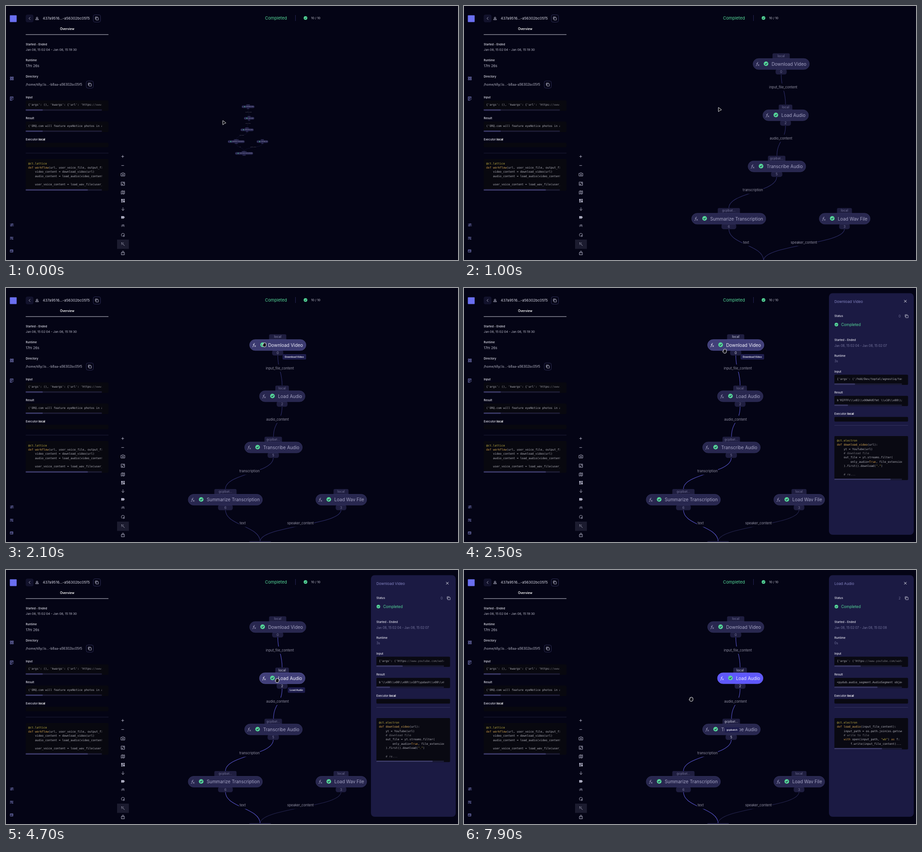
An HTML page that plays this animation: 997 px wide and 561 px high, repeating every 8 s.

```html
<!DOCTYPE html>
<html lang="en">
<head>
<meta charset="utf-8">
<title>Workflow graph</title>
<style>
html, body { margin: 0; width: 100%; height: 100%; overflow: hidden; background: #040415; }
svg { display: block; width: 100%; height: 100%; }
text { font-family: Inter, "Open Sans", sans-serif; white-space: pre; }
.mono { font-family: "DejaVu Sans Mono", monospace; font-size: 6.22px; }
.icon { fill: none; stroke: #a9a9bd; stroke-width: 1; stroke-linecap: round; stroke-linejoin: round; }
.nav { stroke: #6669a8; }
</style>
</head>
<body>
<svg id="stage" viewBox="0 0 997 561" xmlns="http://www.w3.org/2000/svg"></svg>
<script>
const LOOP = 8000, STEP = 100;
const PAGE = '#040415', GREEN = '#55d899', LIGHT = '#e4e4ee', SOFT = '#b9b9c8';
const SYNTAX = { t: '#b4b4bd', y: '#c3b044', o: '#d29a45', g: '#e0b05a', c: '#77777f' };

const esc = s => s.replace(/&/g, '&amp;').replace(/</g, '&lt;');
const text = (x, y, size, str, fill = LIGHT, extra = '') =>
  `<text x="${x}" y="${y + size * .36}" font-size="${size}" fill="${fill}" ${extra}>${esc(str)}</text>`;
const centered = (x, y, size, str, fill, extra = '') =>
  text(x, y, size, str, fill, `text-anchor="middle" ${extra}`);
const rect = (x, y, w, h, fill, r = 0, extra = '') =>
  `<rect x="${x}" y="${y}" width="${w}" height="${h}" rx="${r}" fill="${fill}" ${extra}/>`;
const icon = (x, y, d, extra = '') => `<path class="icon" transform="translate(${x} ${y})" d="${d}" ${extra}/>`;
const during = (from, to, body) => `<g data-from="${from}" data-to="${to}">${body}</g>`;
const check = (x, y, r, mark = PAGE) =>
  `<circle cx="${x}" cy="${y}" r="${r}" fill="${GREEN}"/>` +
  `<path d="M${x - r * .45} ${y}l${r * .33} ${r * .35}l${r * .6} ${-r * .65}" fill="none" stroke="${mark}" stroke-width="${r * .24}"/>`;

// Each piece of a code line starts with its colour key.
const codeLine = (x, y, line) => `<text class="mono" x="${x}" y="${y + 2.1}">` + line.split('|')
  .map(p => `<tspan fill="${SYNTAX[p[0]] || SYNTAX.t}">${esc(p.slice(1))}</tspan>`).join('') + '</text>';

function codeBox(side, y, h, thumb, lines, firstLine) {
  const [x, w, clip, fill, track] = side === 'left'
    ? [43.5, 182.5, 'clipLeft', '#08080f', '#1c1b34'] : [817, 162.5, 'clipRight', '#090912', '#1b1b36'];
  return rect(x, y, w, h, fill, 2) +
    `<g clip-path="url(#${clip})">${lines.map((l, i) => codeLine(x + 5.5, firstLine + i * 9.32, l)).join('')}</g>` +
    rect(x, y + h - 3.2, side === 'left' ? 168 : 149, 3, track, 1) + rect(x, y + h - 3.2, thumb, 3, '#383764', 1);
}

const COPY = 'M-1.5-1.5h5v5h-5zM-3.3 1.6V-3.3H1.6';
const label = (x, y, str) => text(x, y, 6.25, str, LIGHT, 'font-weight="500"');
const executor = (x, y) => label(x, y, 'Executor:') + text(x + 28.5, y, 6.2, 'local', '#fff', 'font-weight="700"');

function leftPanel() {
  return rect(8.5, 20.5, 15, 15, '#6a6ff0', 1) +
    rect(43.5, 19, 17, 17, '#12122c', 4) + icon(52, 27.5, 'M1.2-2.6L-1.4 0L1.2 2.6') +
    icon(68.5, 27.5, 'M-1.6-1.5a1.6 1.6 0 1 1 3.2 0a1.6 1.6 0 1 1-3.2 0M0 .2V3.4M-3.2 2.8Q-3 .2-1.2 0M3.2 2.8Q3 .2 1.2 0M-3.2 2.8h2M3.2 2.8h-2') +
    text(81, 27.5, 8.05, '437a9516...-a56302bc05f5', '#d5d5e2') +
    rect(192.5, 19.5, 16, 16, 'none', 3.5, 'stroke="#303058" stroke-width=".9"') + icon(200.3, 27.4, COPY) +
    centered(135, 50.5, 6.9, 'Overview', '#fff', 'font-weight="600"') + rect(43.5, 62.6, 182.5, 1, '#c8c8d4') +
    label(43.5, 85, 'Started - Ended') + text(43.5, 97, 6.8, 'Jan 08, 15:02:04 - Jan 08, 15:19:30', SOFT) +
    label(43.5, 119.5, 'Runtime') + text(43.5, 132.3, 7.8, '17m 26s', SOFT) +
    label(43.5, 156, 'Directory') + text(43.5, 173.7, 7.1, '/home/tilly/.lo...-b8aa-a56302bc05f5', SOFT) +
    rect(177, 165.7, 15.6, 15.6, 'none', 3.5, 'stroke="#303058" stroke-width=".9"') + icon(184.8, 173.4, COPY) +
    label(43.5, 201.5, 'Input') +
    codeBox('left', 208.5, 23, 37.5, ["t{'args': (), 'kwargs': {'url': 'https:|c//www.videos"], 218) +
    label(43.5, 248.2, 'Result') +
    codeBox('left', 255.3, 23, 37.5, ["t('ORQ.com will feature eyeNotice photos in a new"], 264.7) +
    executor(43.5, 295) + rect(43.5, 302, 182.5, 10, '#08080f', 2) +
    rect(43.5, 324.5, 182.5, .9, '#22223c') +
    codeBox('left', 338, 70, 137, ['y@ct.lattice', 'odef |gworkflow|t(url, user_voice_file, output_file):',
      't    video_content = download_video(url)', 't    audio_content = load_audio(video_content)', 't',
      't    user_voice_content = load_wav_file(user_voice_file)'], 347.5);
}

function navIcons() {
  const n = 'style="stroke:#7476b8"';
  return icon(13, 160, 'M-3.3-3.3h2.4v2.4h-2.4zM.9-3.3h2.4v2.4H.9zM-3.3.9h2.4v2.4h-2.4zM.9.9h2.4v2.4H.9zM-.9-2.1h1.8M-2.1-.9v1.8M2.1-.9v1.8', n) +
    icon(12.8, 204.5, 'M3-1V-4h-6.5v8H0M-2-2H1.5M-2 0H1M-2 2h1.5M1 3.5L3.7.6', n) +
    icon(13, 483.5, 'M-3.8-1.6h4M2.4-1.6h1.4M.6-2.8a1.2 1.2 0 1 1 0 2.4a1.2 1.2 0 1 1 0-2.4M-3.8 1.8h1M0 1.8h3.8M-1.5.6a1.2 1.2 0 1 1 0 2.4a1.2 1.2 0 1 1 0-2.4', n) +
    icon(12.5, 513, 'M-3.3-2.3h6.6M-3.3 0h3M1.2 0h2M-3.3 2.3h1.2M0 2.3h3.3M-1.3-2.8v1M.6-.8v1.6', n) +
    icon(12.5, 541, 'M-2.8-2.6h5.6v5.2h-5.6zM-2.8-1h5.6M0 1h1.3', n);
}

function toolbar() {
  const solid = 'style="fill:#a9a9bd;stroke:none"';
  return rect(245, 516, 26, 20.5, '#1b1b2f') +
    icon(257.4, 332.4, 'M-2.5 0h5M0-2.5v5') + icon(257.4, 352.3, 'M-2.5 0h5') +
    icon(258, 372, 'M-4-2.5h2l.9-1.2h2.2l.9 1.2h2v6h-8zM-1.5.4a1.5 1.5 0 1 1 3 0a1.5 1.5 0 1 1-3 0') +
    icon(258, 392.5, 'M-3.6-3.6h7.2v7.2h-7.2zM0-2h2V0M0 2h-2V0') +
    icon(258, 411.8, 'M-3.6-2.8l2.4-.8l2.4.8l2.4-.8v6.4l-2.4.8l-2.4-.8l-2.4.8zM-1.2-3.6v6.4M1.2-2.8v6.4') +
    icon(258, 430, 'M-4-3.8h3.6V.5H-4zM.4-3.8H4v2.3H.4zM.4-.5H4v4.3H.4zM-4 1.5h3.6v2.3H-4z', solid) +
    icon(258, 448.5, 'M0-3.2V3.2M-3 .3L0 3.2L3 .3') +
    icon(258, 466.8, 'M-4-2.8H1.8L4 0L1.8 2.8H-4z', solid) +
    centered(258, 485, 5.6, '(#)', '#a9a9bd', 'font-weight="600"') +
    icon(258, 505.5, 'M-1 3.4a3.5 3.5 0 1 1 4.4-3M.8 1l3 1.1l-1.5.6l-.5 1.4z') +
    icon(258, 526, 'M-.6-.6L3.2 3.2M-2.5-3.2v1.6M-3.3-2.4h1.6M.8-3v1M-3 .7h1') +
    icon(258, 545.5, 'M-3.2-1h6.4v5h-6.4zM-1.8-1v-1.4a1.8 1.8 0 0 1 3.6 0V-1M0 1.3v.4');
}

const header = () => text(571.3, 26.6, 9.4, 'Completed', GREEN) + rect(638, 20, .9, 13, '#2b2b5c') +
  check(660.6, 26.6, 4) + text(673, 26.6, 6.8, '10 / 10', '#c2c2d0');

// fill, border, title, tag text
const LOOKS = {
  idle: ['#28274f', '#32315c', '#a5a4c4', '#77769c'],
  hover: ['#3b3a70', '#4b4a84', '#ececf8', '#8f8eb0'],
  active: ['#413f79', '#57569a', '#f4f4fc', '#d6d6ea'],
  chosen: ['#5f58fb', '#6a64ff', '#ececff', '#d6d6ea'],
  tagged: ['#28274f', '#32315c', '#a5a4c4', '#d6d6ea']
};

function nodeLook([title, left, width, y, mid, tag, tagWidth, index, badgeWidth], look) {
  const [fill, border, ink, small] = LOOKS[look];
  return rect(mid - tagWidth / 2, y - 23.5, tagWidth, 14, '#1f1e40', 3) + centered(mid, y - 18, 7.15, tag, small) +
    rect(mid - badgeWidth / 2, y + 11.2, badgeWidth, 12, '#1f1e40', 4.5) + centered(mid, y + 17.4, 7.4, index, small) +
    rect(left + .4, y - 11.9, width - .8, 24, fill, 12, `stroke="${border}" stroke-width=".9"`) +
    `<path d="M${left + 6.5} ${y + 4.2}q1.7.3 2.2-2l1-4.3q.5-2 2.1-1.5M${left + 7.8} ${y - .9}h3.4M${left + 11} ${y + .9}l3 3.3m0-3.3l-3 3.3" fill="none" stroke="${ink}" stroke-width=".9"/>` +
    check(left + 29, y - .5, 5.1, '#28274f') + text(left + 41.2, y + .3, 9.92, title, ink);
}
const node = (spec, looks = [[0, 'idle']]) => looks.map(([from, look], i) =>
  during(from, looks[i + 1] ? looks[i + 1][0] : LOOP, nodeLook(spec, look))).join('');

const edge = (x1, y1, x2, y2, lit) => {
  const m = (y1 + y2) / 2;
  const path = color => `<path d="M${x1} ${y1}C${x1} ${m} ${x2} ${m} ${x2} ${y2}" fill="none" stroke="${color}" stroke-width="1.1"/>`;
  return during(0, 2300, path('#2f2f6a')) + during(2300, LOOP, path(lit ? '#5653c6' : '#25254f'));
};
const edgeLabel = (x, y, w, str) => rect(x - w / 2, y - 8, w, 16, PAGE) + centered(x, y, 7.5, str, '#9291a4');
const tooltip = (x, y, w, str) => rect(x - w / 2, y - 6, w, 12, '#1e1d4d', 2) +
  centered(x, y, 5.3, str, '#f2f2fa', 'font-weight="600"');

function graph() {
  return edge(599.5, 149, 609, 215, true) + edge(609, 262, 590, 329, true) + edge(589.5, 375, 484, 444, true) +
    edge(739, 490, 560.5, 560, false) + edge(484, 490, 560.5, 560, true) +
    edgeLabel(604, 177, 66, 'input_file_content') + edgeLabel(599, 290, 53, 'audio_content') +
    edgeLabel(537, 404.5, 46, 'transcription') + edgeLabel(522, 519.7, 16, 'text') +
    edgeLabel(649.5, 519.7, 60, 'speaker_content') +
    node(['Download Video', 537, 125, 125.8, 599.3, 'local', 38, '0', 24.5],
      [[0, 'idle'], [2000, 'hover'], [2300, 'active'], [3100, 'idle']]) +
    node(['Load Audio', 558.7, 101.3, 239, 609, 'local', 30, '2', 24],
      [[0, 'idle'], [3500, 'active'], [6500, 'chosen']]) +
    node(['Transcribe Audio', 526, 128, 352, 589.5, 'gcpbat...', 38.5, '5', 25], [[0, 'idle'], [6600, 'tagged']]) +
    node(['Summarize Transcription', 401.5, 164.5, 467.5, 484, 'gcpbat...', 49, '6', 32.5]) +
    node(['Load Wav File', 683, 113, 467.5, 739, 'local', 33, '3', 23.5]) +
    node(['Clone Voice From Summary', 473, 175, 582.5, 560.5, 'gcpbat...', 49, '7', 32.5]) +
    during(2000, 3200, tooltip(636, 152, 52, 'Download Video')) +
    during(3600, 6500, tooltip(640.6, 265.2, 38, 'Load Audio')) +
    during(6700, LOOP, tooltip(591, 353, 33, 'gcpbatch'));
}

function detailPanel() {
  const dim = '#77779f';
  const summary = (title, index, dates, runtime) => text(817, 30, 8.15, title, '#8484c2') +
    text(958.8, 62.3, 7, index, dim) + text(817, 127, 6.95, dates, dim) + text(817, 161.5, 7, runtime, dim);
  const input = (thumb, line) => codeBox('right', 191.5, 22.5, thumb, [line], 201);
  const result = (thumb, line) => codeBox('right', 238.2, 22.5, thumb, [line], 247.6);
  return rect(805, 11.5, 187, 533.5, '#1b1a43', 8) +
    icon(973.5, 29.2, 'M-2.4-2.4l4.8 4.8M2.4-2.4l-4.8 4.8', 'style="stroke:#f0f0f6"') +
    label(817, 62, 'Status') + icon(976.3, 62.2, COPY) +
    check(821.4, 80.8, 4, '#1b1a43') + text(832, 81, 8.35, 'Completed', GREEN) +
    label(817, 115, 'Started - Ended') + label(817, 149.6, 'Runtime') +
    label(817, 184.5, 'Input') + label(817, 231.2, 'Result') +
    executor(817, 278) + rect(817, 284.7, 162.5, 10.3, '#090912', 2) + rect(817, 303, 162.5, .9, '#34335f') +
    during(0, 5000, summary('Download Video', '0', 'Jan 08, 15:02:04 - Jan 08, 15:02:07', '3s')) +
    during(5000, LOOP, summary('Load Audio', '2', 'Jan 08, 15:02:07 - Jan 08, 15:02:08', '0s')) +
    during(0, 3200, input(45.5, "t{'args': ('/hdd/Dev/toptal/agnostiq/test") +
      result(30, String.raw`tb'RIFFFc\\x01\\x00WAVEfmt \\x10\\x00\\x00`)) +
    during(3200, LOOP, input(58, "t{'args': ('https:|c//www.youtube.com/watch")) +
    during(3200, 6500, result(30, String.raw`tb'\\x00\\x00\\x00\\x18ftypdash\\x00\\x00`)) +
    during(6500, LOOP, result(95, 't<pydub.audio_segment.AudioSegment object')) +
    during(0, 6200, codeBox('right', 327, 97.3, 124, ['y@ct.electron', 'odef |gdownload_video|t(url):',
      't    yt = YouTube(url)', 'c    # download file', 't    out_file = yt.streams.filter(',
      't        only_audio=|oTrue|t, file_extension', 't    ).first().download(|y"."|t)', 't', 'c    # re...'], 337)) +
    during(6200, LOOP, codeBox('right', 327, 69.3, 105, ['y@ct.electron', 'odef |gload_audio|t(input_file_content):',
      't    input_path = os.path.join(os.getcwd()', 'c    # write to file',
      'o    with |topen(input_path, |y"wb"|t) |oas|t f:', 't        f.write(input_file_content)...'], 337));
}

const ARROW = '<path d="M-2.4-4.6Q-2.8-5.2-2-4.8L4.2-.2Q4.8.4 4 .8L1 1.5L-1.5 4.2Q-2.2 4.8-2.3 3.8Z" fill="#08080f" stroke="#fff" stroke-width=".9"/>';
const HAND = '<path d="M-3 1V-2.5q.9-1.2 1.8 0V-3.6q.9-1.3 1.8 0v-.2q.9-1 1.8.2v1q.9-.8 1.6.3V2Q3.8 4.8 1 5H-1Q-2.8 4.6-4.6 1.2q0-1.2 1.6-.2Z" fill="#14141c" stroke="#fff" stroke-width=".9"/>';

const stage = document.getElementById('stage');
stage.innerHTML = '<defs><clipPath id="clipLeft"><rect x="43.5" y="200" width="168" height="220"/></clipPath>' +
  '<clipPath id="clipRight"><rect x="817" y="180" width="149" height="260"/></clipPath></defs>' +
  `<g id="graph">${graph()}</g>` + rect(0, 0, 240, 561, PAGE) + leftPanel() + navIcons() + toolbar() + header() +
  `<g id="detail">${detailPanel()}</g>` +
  `<g id="cursor">${during(0, 1900, ARROW) + during(1900, LOOP, HAND)}</g>`;

const CURSOR = [[0, 480.5, 258], [700, 480.5, 258], [1000, 563.5, 229], [1100, 563.5, 229], [1500, 463.5, 227],
  [2000, 570, 125], [2200, 570, 125], [2500, 575, 139], [3000, 580, 170], [3700, 598, 243.5], [6000, 598, 243.5],
  [6300, 572.5, 305], [6600, 583, 332], [6900, 560, 315], [7200, 488, 262], [7400, 497, 242], [7700, 505, 305],
  [7900, 501, 285]];
const PAN = [[0, 100.2, 2.2], [1100, 100.2, 2.2], [1500, 0, 0]];
const ZOOM = [[0, 0], [200, 0], [800, 1]];
const SLIDE = [[0, 200], [2100, 200], [2200, 130], [2300, 45], [2400, 0]];
const SMALL = { scale: .2255, x: 398.8, y: 194.1 };

function track(keys, t) {
  const next = keys.findIndex(k => k[0] > t);
  if (next < 0) return keys[keys.length - 1].slice(1);
  const a = keys[next - 1], b = keys[next], p = (t - a[0]) / (b[0] - a[0]);
  return a.slice(1).map((v, i) => v + (b[i + 1] - v) * p);
}

const move = (id, value) => document.getElementById(id).setAttribute('transform', value);
const timed = [...stage.querySelectorAll('[data-from]')];

function draw(t) {
  const scale = SMALL.scale ** (1 - track(ZOOM, t)[0]);
  const near = (scale - SMALL.scale) / (1 - SMALL.scale);
  const [px, py] = track(PAN, t);
  move('graph', `translate(${SMALL.x + (px - SMALL.x) * near} ${SMALL.y + (py - SMALL.y) * near}) scale(${scale})`);
  move('detail', `translate(${track(SLIDE, t)[0]} 0)`);
  move('cursor', `translate(${track(CURSOR, t).join(' ')})`);
  for (const el of timed)
    el.style.display = t >= +el.dataset.from && t < +el.dataset.to ? '' : 'none';
}

const start = performance.now();
function tick() {
  const t = (performance.now() - start) % LOOP;
  draw(Math.floor(t / STEP) * STEP);
  requestAnimationFrame(tick);
}
tick();
</script>
</body>
</html>
```
